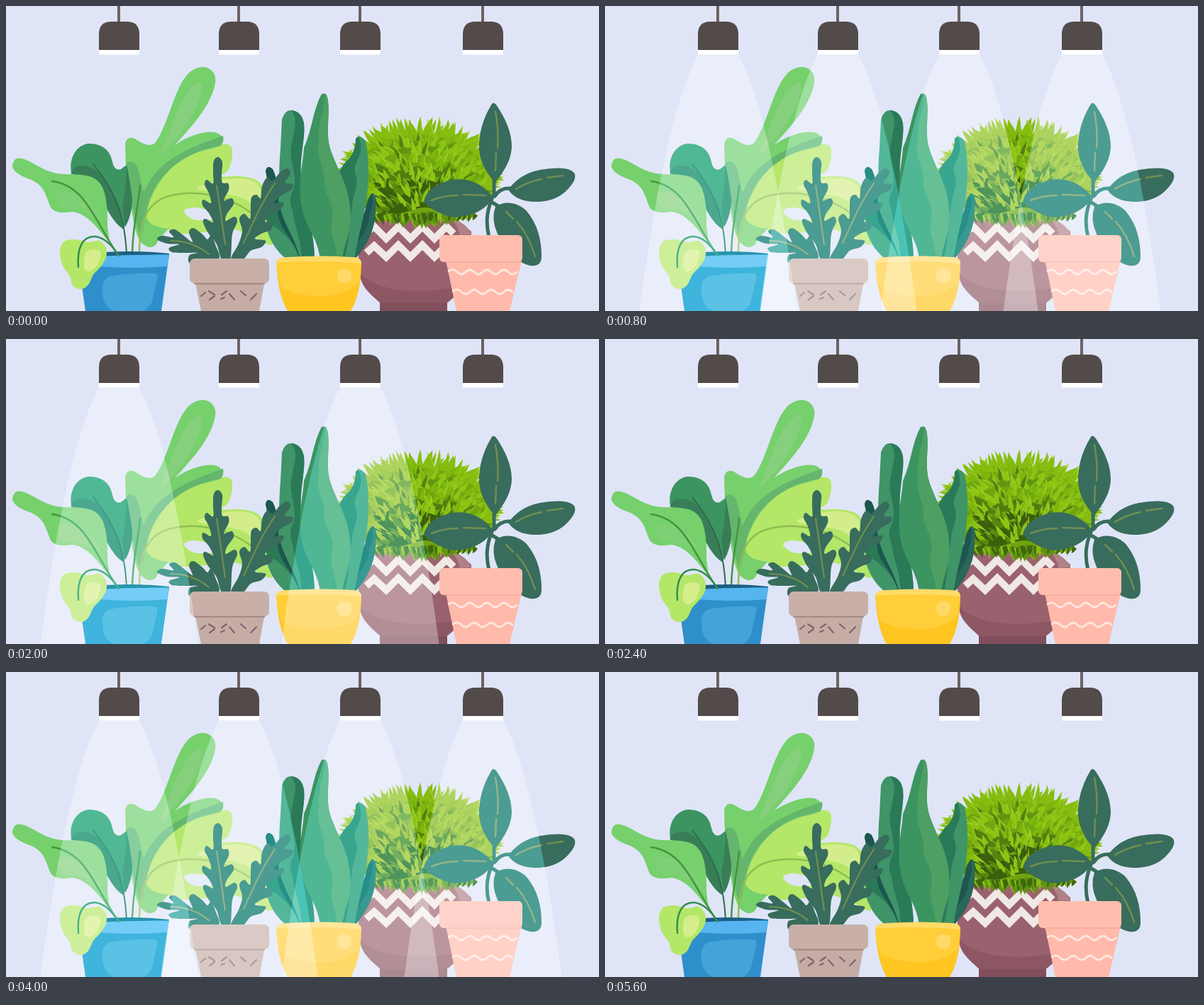
An HTML page for the animation above (6600 ms loop, 836 by 430 pixels).

```html
<!DOCTYPE html>
<html lang="en">
<head>
<meta charset="utf-8">
<title>Plants under lamps</title>
<style>
html, body { margin: 0; width: 100%; height: 100%; overflow: hidden; background: #dfe5f7; }
svg { display: block; width: 836px; height: 430px; isolation: isolate; }
.beam { animation: 6600ms step-end infinite; }
.beam path:first-child { mix-blend-mode: screen; fill: rgb(0, 84, 84); }
.beam path:last-child { mix-blend-mode: overlay; fill: rgb(170, 128, 128); }
</style>
</head>
<body>
<svg id="stage" viewBox="0 0 836 430" xmlns="http://www.w3.org/2000/svg"></svg>
<script>
const LOOP = 6600;
const parts = [];
const add = s => parts.push(s);
const path = (d, fill, extra = '') => add(`<path d="${d}" fill="${fill}" ${extra}/>`);
const line = (d, color, w = 2, extra = '') =>
  path(d, 'none', `stroke="${color}" stroke-width="${w}" stroke-linecap="round" stroke-linejoin="round" ${extra}`);
const rect = (x, y, w, h, fill, r = 0) =>
  add(`<rect x="${x}" y="${y}" width="${w}" height="${h}" rx="${r}" fill="${fill}"/>`);

// Closed smooth curve through the points
function blob(text, fill) {
  const p = text.split(' ').map(s => s.split(',').map(Number));
  const n = p.length;
  let d = 'M' + p[0];
  for (let i = 0; i < n; i++) {
    const [a, b, c, e] = [-1, 0, 1, 2].map(k => p[(i + k + n) % n]);
    const ctl = (m, u, v, s) => [0, 1].map(k => (m[k] + s * (v[k] - u[k]) / 6).toFixed(1));
    d += `C${ctl(b, a, c, 1)} ${ctl(c, b, e, -1)} ${c}`;
  }
  path(d + 'Z', fill);
}

let seed = 11;
const rnd = () => (seed = (seed * 16807) % 2147483647) / 2147483647;

function lamps() {
  for (const x of [159.5, 328.5, 499.5, 672.5]) {
    rect(x - 2.5, 0, 4, 24, '#6b6263');
    path(`M${x - 28.5} 62V40Q${x - 28.5} 22 ${x - 11} 22H${x + 11}Q${x + 28.5} 22 ${x + 28.5} 40V62Z`, '#534a4a');
    rect(x - 28.5, 62, 57, 6.5, '#fff');
  }
}

function purplePot() {
  rect(527, 414, 95, 16, '#814f5b');
  const body = 'M520 296C500 312 496 338 497 364C499 390 514 405 528 419H621C645 404 656 372 656 345V318L630 296Z';
  path(body, '#9a626e');
  path('M498 374C515 400 570 407 625 398L640 401L621 419H528C510 403 500 395 498 374Z', '#8c5763');
  path('M628 300Q650 306 656 322L640 323Q636 308 628 300Z', '#b18088');
  const zigzag = (pts) => path('M' + pts, 'none', 'stroke="#f0e8e5" stroke-width="10"');
  zigzag('502 323L519 311L536 328L553 311L570 328L587 311L604 328L621 311L631 321');
  zigzag('508 348L519 338L536 354L553 337L570 354L587 337L604 354L620 338');
}

function blade(x, y, angle, len, w, fill, edge) {
  const ux = Math.cos(angle), uy = Math.sin(angle), bend = (rnd() - .5) * len * .5;
  const at = (f, s) => `${(x + ux * f - uy * s).toFixed(1)} ${(y + uy * f + ux * s).toFixed(1)}`;
  const tip = at(len, bend);
  path(`M${at(0, -w)}Q${at(len * .6, -w)} ${tip}Q${at(len * .5, w)} ${at(0, w)}Z`, fill);
  if (edge) line(`M${at(0, w)}Q${at(len * .5, w)} ${tip}`, edge, 1);
}

function bush() {
  const cx = 583, cy = 240;
  for (let i = 0; i < 150; i++) {
    const a = i / 150 * Math.PI * 2, c = Math.cos(a), s = Math.sin(a);
    const len = (s > .3 ? 14 : 24) + rnd() * 8;
    blade(cx + c * 88, cy + s * 54, Math.atan2(s * 1.1, c) + (rnd() - .5) * .7, len, 4,
      s > .35 ? '#5f9312' : '#86bd10', rnd() < .4 && '#a9d72a');
  }
  add(`<ellipse cx="${cx}" cy="${cy}" rx="92" ry="58" fill="#6fa50f"/>`);
  blob('520,262 545,252 575,258 598,246 630,262 652,258 655,282 625,292 590,284 550,293 524,284', '#3a5f0d');
  blob('520,222 550,232 590,225 640,232 628,242 590,240 550,247 522,238', '#4f7e10');
  blob('528,196 560,188 600,198 640,194 622,206 580,206 545,209', '#5f9510');
  for (let row = 0; row < 9; row++) {
    const v = -.85 + row * .2, half = Math.sqrt(1 - v * v) * 86;
    const n = Math.round(half / 2.4);
    for (let i = 0; i < n; i++) {
      const u = (i + rnd()) / n * 2 - 1;
      const x = cx + u * half, y = cy + v * 56 + Math.sin(u * 11 + row * 2) * 6;
      const dark = v > .2 && Math.abs(u) < .75;
      const tone = rnd();
      const fill = dark && tone < .62 ? (tone < .36 ? '#3a5f0d' : '#55860f')
        : tone < .14 ? '#557f10' : tone < .6 ? '#7db70e' : '#8cc414';
      blade(x, y, -Math.PI / 2 + u * 1.1 + (rnd() - .5) * .8, 11 + rnd() * 11, 3.2,
        fill, rnd() < .45 && '#a8d62c');
    }
  }
  for (let i = 0; i < 48; i++) {
    const x = 512 + i * 3.2;
    blade(x, 290 + rnd() * 5, Math.PI / 2 + (x - cx) / 160, 9 + rnd() * 8, 3,
      ['#86bd10', '#5f9312', '#3f660e'][Math.floor(rnd() * 3)]);
  }
}

function leafyPlant() {
  // broad lime leaf
  blob('192,325 193,295 207,258 235,223 272,203 300,195 316,197 319,210 314,230 304,240 328,240 350,244 362,255 370,280 378,305 375,336 350,326 318,314 288,318 250,321 222,315', '#b4e768');
  blob('251,289 263,284 278,286 290,291 300,299 280,302 262,300', '#dfe5f7');
  blob('270,257 300,246 330,243 352,249 359,263 352,282 335,271 305,264', '#d4ed8c');
  // tall green leaf
  path('M168 194Q172 179 188 191Q203 200 210 193C229 170 238 107 262 91C280 79 298 90 295 108C290 140 261 171 238 196C261 180 300 168 306 188Q307 198 282 203C238 213 207 250 198 292Q196 302 208 309Q224 315 230 313Q215 329 211 337Q202 345 190 333C179 318 175 271 169 229Z', '#76d06c');
  path('M306 183Q308 195 300 198C255 204 213 234 200 281Q194 303 198 292L190 327Q179 300 170 221Q185 212 190 247L194 263C211 224 241 205 306 183Z', '#65b56d');
  path('M274 107C286 113 259 169 235 193Q219 213 218 207C229 182 249 111 274 107Z', '#8ad080', 'opacity=".8"');
  line('M188 351C188 313 193 281 226 269C267 257 312 267 345 291', '#8fbd51', 2.5);
  // dark leaf
  path('M92 236C88 211 102 195 117 194C134 194 147 202 150 220Q153 233 162 230L170 224Q174 245 178 273Q178 294 165 314C147 303 137 272 124 254Q112 239 92 236Z', '#3c9560');
  path('M92 237Q94 224 109 225C139 228 149 265 161 285L165 314C147 303 137 272 124 254Q112 239 92 237Z', '#387d58');
  path('M170 224Q175 246 178 273Q178 294 168 312L164 283Q170 254 170 224Z', '#387d58');
  line('M123 223C147 253 168 287 170 352', '#2f6a4a');
  // left leaf
  path('M9 226Q10 212 22 215C42 220 53 236 82 237C108 238 128 236 137 258Q144 276 143 310L146 333C131 317 118 294 94 290Q69 294 63 284C55 265 55 255 36 245Q11 237 9 226Z', '#76d06c');
  path('M70 262C96 257 121 269 137 306Q113 285 85 286Q69 280 70 262Z', '#85d17c', 'opacity=".6"');
  line('M65 247C113 253 125 304 158 351', '#45953f', 2.5);
  line('M189 253C187 280 178 312 178 353', '#45953f', 2.5);
  // blue pot
  path('M139 347Q188 344 230 349L229 356H137Z', '#1d5f86');
  path('M103 367Q160 350 230 350L219 430H112Z', '#2f8fcb');
  path('M130 353Q179 350 230 351L227 367Q180 371 130 367Z', '#56b5f1');
  path('M146 381Q178 376 209 377Q215 377 213 385L207 412Q205 424 194 430H153Q136 424 136 402Q134 387 146 381Z', '#44a4da');
  // hanging leaf
  blob('76,346 82,332 98,329 116,333 132,331 141,341 141,355 133,368 123,379 116,393 106,399 94,394 90,381 80,366', '#b4e768');
  blob('110,359 113,347 123,343 133,346 132,357 127,368 117,374 111,370', '#d5ee8b');
  line('M102 368C100 342 107 324 126 325Q143 327 159 352', '#358e50', 2.5);
}

function snakePlant() {
  const [deep, dark, mid, light] = ['#1d564e', '#2a7a58', '#3f9468', '#4d9f63'];
  // far left
  path('M366 233Q368 223 376 230C387 253 383 280 399 303Q419 326 423 358H398C380 337 366 316 366 287Q374 260 366 233Z', dark);
  path('M366 233Q368 223 376 230C387 253 383 280 399 303Q419 326 423 358H413C404 322 384 316 383 288Q371 263 366 233Z', deep);
  path('M365 304Q380 310 390 320Q408 335 414 358H397Q372 340 365 304Z', mid);
  // far right
  path('M516 264Q523 264 521 284C521 315 510 336 491 358H474C483 325 503 304 508 282Q510 270 516 264Z', deep);
  path('M516 264Q523 264 521 284C521 315 510 336 491 358H485C493 329 513 316 512 296Q519 282 516 264Z', '#2a675b');
  // left tall
  path('M389 160Q393 146 403 147Q416 149 419 162C424 187 412 213 417 252C423 289 435 318 435 358H415C408 325 389 306 384 274C386 249 384 235 387 200Z', mid);
  path('M402 147Q416 148 420 165C423 189 411 213 417 252C423 289 435 318 435 358H417C416 324 406 312 404 288Q397 275 405 259C412 234 397 219 403 194C407 171 412 159 402 147Z', dark);
  // right
  path('M496 184Q503 184 507 191C512 211 512 245 509 265C505 300 496 325 491 358H468L467 239Q475 222 485 214Q495 203 496 184Z', mid);
  path('M496 184Q500 188 500 197C503 211 489 222 492 235C500 254 487 268 488 283C483 306 485 330 477 358H465L467 239Q475 222 485 214Q493 203 493 187Z', dark);
  // centre
  path('M445 124Q452 121 454 134C457 159 449 181 459 207C469 234 482 251 485 285C488 320 476 334 474 358H443C440 326 421 311 417 283C410 253 419 222 420 200C432 173 433 145 445 124Z', '#3c9460');
  path('M449 123Q453 124 454 134C457 159 449 181 459 207C469 234 482 251 485 285C488 320 476 334 474 358H467C464 327 455 321 460 300C464 275 445 263 449 243C447 223 436 211 441 190C439 163 451 142 449 123Z', light);
  // yellow pot
  path('M381 360Q383 407 397 430H486Q501 405 501 360Z', '#ffc521');
  path('M381 360Q382 384 389 398C431 416 477 412 498 389L501 360Z', '#ffce38');
  path('M381 362Q381 354 397 354Q443 351 489 354Q501 354 501 363Q442 357 381 362Z', '#ffdb68');
  add('<circle cx="477" cy="380" r="10.5" fill="#ffd968"/>');
}

function lobedPlant() {
  const green = '#386c5c', vein = '#6f8f51';
  blob('299,213 305,220 304,236 305,249 313,250 314,259 307,274 318,271 321,279 311,294 310,303 322,297 326,304 319,322 316,357 304,357 297,336 285,320 278,305 281,300 292,305 286,292 277,281 278,273 289,278 286,264 280,252 283,245 292,250 292,233 293,218', green);
  blob('396,229 401,236 393,249 404,251 402,259 388,267 378,278 391,277 388,286 373,295 365,304 375,305 374,315 360,321 351,328 366,331 360,340 345,345 334,357 317,357 328,335 333,317 329,300 336,293 344,300 345,284 346,270 353,266 359,271 361,254 368,242 376,246 386,235', green);
  blob('213,329 220,324 236,326 230,318 238,315 251,324 263,333 258,319 264,313 277,322 284,329 289,324 295,336 299,358 262,364 258,352 270,348 251,348 234,347 230,341 244,336 227,335', green);
  line('M297 253C302 284 304 303 309 336M379 250C359 279 352 298 335 334M232 331Q264 331 286 350', vein, 2.2);
  // grey pot
  path('M266 386H365L357 430H275Z', '#c5ada5');
  rect(259, 356, 112, 35, '#c8b0a8', 7);
  line('M266 391.5H364', '#a3867f', 2.2);
  line('M275 409L281 404M286 402L294 407M287 414L294 409M304 407L311 402M315 406L322 414M331 402L338 408M345 414L353 406M303 413L308 411', '#806370', 2.2);
}

function pinkPlant() {
  const green = '#386c5c', vein = '#6f8f51';
  line('M681 326C675 302 679 284 688 265V246M689 268Q697 256 711 257M684 276L697 284', green, 5);
  path('M685 138Q687 135 691 139C704 158 713 178 713 198C712 221 699 236 690 249C675 234 666 215 667 195C668 171 676 153 685 138Z', green);
  path('M708 259C724 237 746 230 770 229Q793 227 801 235Q804 241 800 248C787 269 767 277 744 276Q719 275 708 259Z', green);
  path('M589 276C592 260 607 250 629 245C652 241 673 251 687 270C676 288 656 297 632 298C612 295 600 286 589 276Z', green);
  path('M690 283C702 274 721 276 734 289C749 307 755 329 755 353Q755 368 739 366C719 362 701 340 692 319Q684 300 690 283Z', green);
  line('M690 149Q695 176 693 200M691 207L690 232', vein, 2.5);
  line('M719 258Q735 248 755 244M763 242L785 239', vein, 2.5);
  line('M600 274Q617 267 637 267M645 266L676 267', vein, 2.5);
  line('M705 290L715 300M720 304Q737 323 746 353', vein, 2.5);
  // pink pot
  path('M620 358H727L710 430H635Z', '#ffbaab');
  rect(611, 323, 117, 38, '#ffbdae', 6);
  line('M620 361H726', '#f5aa9d', 1.5);
  const wave = (x, y, n) => line(`M${x} ${y}q6 -5 12 1` + 't12 0'.repeat(n), '#ffe7df', 2.6);
  wave(624, 374, 7);
  wave(630, 402, 6);
}

// Times at which each lamp goes on, off, on, off
const lights = [
  [159.5, [200, 2400, 3600, 5600]],
  [328.5, [400, 1800, 3800, 5200]],
  [499.5, [600, 2200, 3400, 5000]],
  [672.5, [800, 2000, 4000, 5400]]
];

function beams() {
  let css = '';
  lights.forEach(([x, times], i) => {
    const d = `M${x - 28.5} 68.5Q${x - 74} 152 ${x - 111} 430H${x + 111}Q${x + 74} 152 ${x + 28.5} 68.5Z`;
    add(`<g class="beam" style="animation-name:lamp${i}"><path d="${d}"/><path d="${d}"/></g>`);
    const steps = times.map((t, k) => `${t / LOOP * 100}%{visibility:${k % 2 ? 'hidden' : 'visible'}}`);
    css += `@keyframes lamp${i}{0%,100%{visibility:hidden}${steps.join('')}}`;
  });
  document.head.appendChild(document.createElement('style')).textContent = css;
}

rect(0, 0, 836, 430, '#dfe5f7');
[lamps, purplePot, bush, leafyPlant, snakePlant, lobedPlant, pinkPlant, beams].forEach(draw => draw());
document.getElementById('stage').innerHTML = parts.join('');
</script>
</body>
</html>
```
